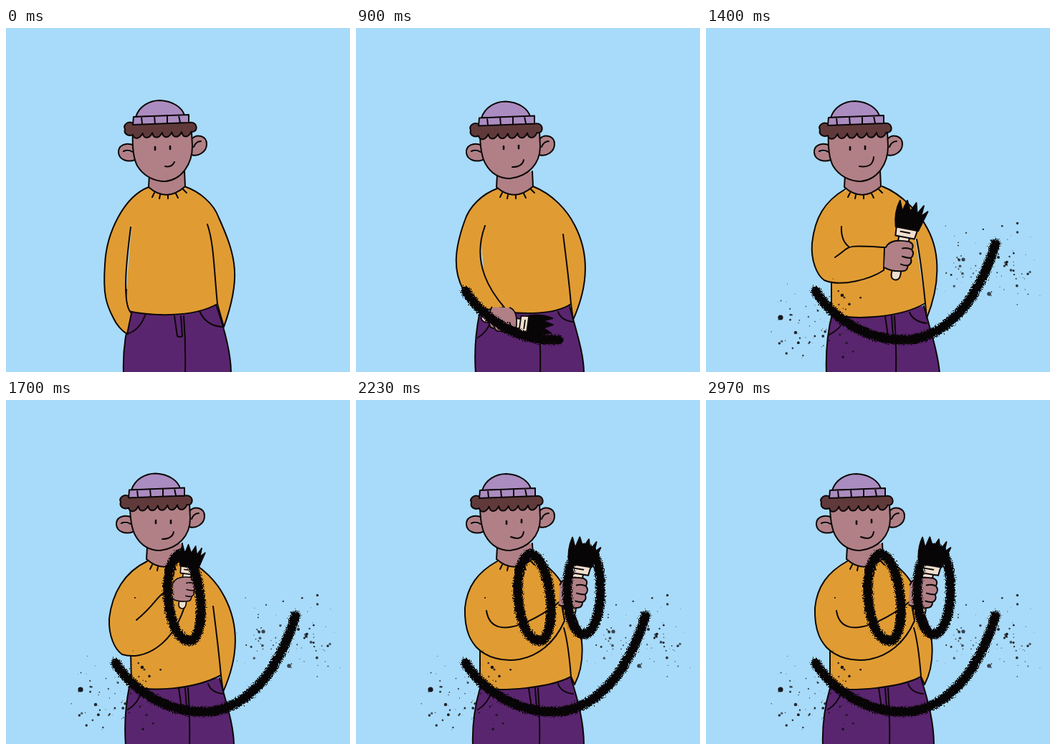
Recreate the animation shown at these times as an HTML page. Size 480 px wide and 480 px high, loop 3.01 s.

```html
<!DOCTYPE html>
<html lang="en">
<head>
<meta charset="utf-8">
<title>Painting a smile</title>
<style>
  html, body { margin: 0; width: 100%; height: 100%; overflow: hidden; background: #a8dbf9; }
  svg { display: block; width: 100vw; height: 100vh; }
  .line { fill: none; }
  .sweater { fill: #e09c33; }
  .skin { fill: #b08086; }
  .pants { fill: #5a256f; }
  .hat { fill: #ab8cc0; }
  .hair { fill: #603a3b; }
  .wood { fill: #f0dfce; }
  .ink { fill: #080506; }
</style>
</head>
<body>
<svg viewBox="0 0 480 480" stroke="#0c0708" stroke-width="2" stroke-linecap="round" stroke-linejoin="round">
  <defs>
    <filter id="rough" filterUnits="userSpaceOnUse" x="0" y="0" width="480" height="480" color-interpolation-filters="sRGB">
      <feTurbulence type="fractalNoise" baseFrequency=".65" numOctaves="2" seed="4"/>
      <feDisplacementMap in="SourceGraphic" scale="9" xChannelSelector="R" yChannelSelector="G"/>
    </filter>
  </defs>
  <rect width="480" height="480" fill="#a8dbf9" stroke="none"/>

  <path id="pants" class="pants"/>
  <g id="seam" class="line">
    <path d="M248 402Q251 440 250 482M235 402L239 430Q242 432 246 430L244 402"/>
  </g>
  <path id="pockets" class="line"/>
  <path id="torso" class="sweater" stroke="none"/>
  <path id="sleeve" class="sweater"/>
  <path id="hem" class="line"/>
  <path id="arm" class="sweater"/>
  <path id="fold" class="line"/>

  <g id="head">
    <path class="skin" d="M200 205L199 222Q224 244 250 221L249 200"/>
    <path class="line" d="M207 230L204 236M215 233L214 238M226 233L226 238M237 231L240 237M247 225L252 230"/>
    <path class="skin" d="M179 164C166 158 156 165 157 174C158 184 170 188 180 184M164 172Q170 169 177 173"/>
    <path class="skin" d="M259 155C266 147 280 150 280 162C280 173 268 180 259 177M262 166Q265 158 272 158"/>
    <path id="face" class="skin"/>
  </g>
  <path id="eyes" stroke-width="2.6"/>
  <path id="mouth" class="line"/>
  <g id="cap">
    <path id="hair" class="hair"/>
    <path class="hat" d="M181 124C186 109 200 101 215 101C233 102 246 111 249 122Z"/>
    <path class="hat" d="M178 124L255 121V132L177 135ZM189 124L190 134M207 123L208 134M225 122L225 133M241 122L243 132"/>
  </g>

  <g id="brush">
    <path class="wood" d="M-6 -28L-6 20Q-8 34 0 34Q8 34 6 20L9 -28Z"/>
    <path class="wood" d="M-12 -41H18L16 -27H-11ZM-5 -34H8"/>
    <path class="ink" d="M-13 -39Q-19 -58 -14 -76L-8 -62L-4 -78L3 -64L9 -77L13 -62L20 -75L19 -60L27 -68Q22 -50 19 -39Z"/>
    <path class="skin" d="M-21 -8C-18 -20 -4 -22 10 -22Q18 -20 15 -12Q21 -7 16 0Q20 7 14 11Q15 19 8 20Q-6 24 -18 20M15 -12Q8 -14 2 -11M16 0Q10 1 4 0M14 11Q9 12 4 11"/>
  </g>

  <g id="ink" class="line" stroke="#080506" stroke-width="13.5" filter="url(#rough)">
    <path pathLength="100" d="M153 367C180 410 230 436 275 435C335 435 380 380 404 301"/>
    <path pathLength="100" d="M243 215C215 224 222 336 257 336C284 330 272 215 242 215"/>
    <path pathLength="100" d="M320 207C288 206 286 318 316 327C347 328 350 215 322 207"/>
  </g>
  <g id="splatter" stroke="none" fill="#141318"></g>
</svg>
<script>
const LOOP = 3010, HOLD = 50;
const $ = id => document.getElementById(id);
const clamp = x => Math.max(0, Math.min(1, x));

// rig: head x, cap x, cap y, seam x, hand x, hand y, hand angle, hand scale
const idle = {
  arm: 'M199 222C165 235 140 285 138 330C135 372 140 386 150 405C154 414 162 423 169 427L175 398C160 385 170 310 174 278',
  sleeve: 'M249 221C270 228 290 245 297 265C322 320 328 350 304 417L295 385C290 335 290 300 281 274',
  hem: '168 365L166 394C200 402 260 405 295 385',
  pants: 'M175 397C166 425 163 455 164 482L314 482C314 455 305 420 293 386',
  pockets: 'M169 427Q186 422 194 401M270 395Q280 417 304 417',
  fold: 'M174 278Q174 278 174 278',
  face: 'M177 145C176 165 177 180 183 192C192 207 207 214 222 214C245 212 260 190 260 165L259 145',
  eyes: 'M208 166L208 170M229 165L229 169',
  mouth: 'M222 193Q231 195 235 187',
  rig: '0 0 0 0 185 400 240 .9'
};
const drag = {
  arm: 'M197 224C175 232 158 250 152 268C136 312 136 340 150 366C160 378 172 388 183 393L207 390C190 370 160 330 180 276',
  sleeve: 'M247 221C275 232 295 255 305 275C326 315 324 360 303 407L300 385C297 350 293 320 289 288',
  hem: '181 372L190 392C220 400 275 402 300 385',
  pants: 'M172 400C166 430 165 455 167 482L318 482C318 455 308 425 298 388',
  pockets: 'M170 432Q184 424 190 405M282 396Q286 408 303 410',
  fold: 'M180 276Q180 276 180 276',
  face: 'M176 145C176 165 178 180 184 190C192 204 204 210 218 210C243 207 260 190 260 165L259 145',
  eyes: 'M206 165L206 169M227 164L227 168',
  mouth: 'M218 194Q232 194 234 184',
  rig: '-3 -6 1.5 7 205 408 98 .9'
};
const sweep = {
  ...drag,
  arm: 'M196 225C170 240 150 270 150 300C152 330 172 350 190 355C240 365 290 355 328 342L324 314C280 318 210 330 185 285',
  hem: '174 340L175 399C205 407 270 404 300 385',
  rig: '-5 -6 1 10 348 328 60 .9'
};
const chest = {
  arm: 'M194 225C165 242 152 265 148 300C146 325 155 345 165 352C190 362 230 350 248 338L249 306C190 303 205 303 180 320',
  sleeve: 'M246 221C275 232 300 262 309 280C328 315 326 360 308 405L306 384C303 355 300 325 294 295',
  hem: '175 350L175 399C205 408 270 405 306 384',
  pants: 'M176 399C168 430 167 455 168 482L326 482C324 455 314 425 304 388',
  pockets: 'M172 428Q188 420 194 405M284 397Q290 410 308 412',
  fold: 'M189 277Q188 296 199 305',
  face: idle.face,
  eyes: 'M201 166L201 170M222 165L222 169',
  mouth: 'M214 193Q233 196 234 180',
  rig: '-6 -7 1 15 270 318 11 1'
};
const leftEye = {
  ...drag,
  arm: 'M197 225C165 240 148 270 144 305C143 330 152 348 162 355C190 364 235 345 252 278L234 265C210 268 215 280 182 307',
  hem: '174 350L175 399C200 407 260 405 300 384',
  eyes: 'M209 168L209 172M230 168L230 172',
  rig: '-3 -6 1.5 6 249 264 8 .8'
};
const rightEye = {
  ...drag,
  arm: 'M197 225C170 240 155 260 152 290C151 325 162 338 168 345C195 373 262 374 291 308L286 280C262 300 190 345 182 294',
  sleeve: 'M247 222C265 228 290 245 300 290C322 330 318 372 305 397L300 386C298 360 295 335 290 318',
  hem: '173 350L173 402C205 407 270 402 300 386',
  pants: 'M173 402C165 430 162 455 163 482L318 482C318 450 310 420 300 388',
  eyes: 'M210 169L210 173M231 167L231 171',
  mouth: 'M216 191Q232 197 234 184',
  rig: '-3 -5 2 6 304 269 9 1'
};
const reach = { ...mix(drag, chest, .6), rig: '-2 -4 1 4 218 338 240 .9' };

const keys = [
  [0, idle], [570, idle], [770, reach], [900, drag], [1070, sweep], [1250, chest], [1500, chest],
  [1570, leftEye], [1630, mix(leftEye, chest, .8)], [1690, leftEye], [1780, leftEye],
  [1920, rightEye], [2010, mix(rightEye, sweep, .4)], [2110, rightEye], [LOOP, rightEye]
];
const strokes = [[760, 1075], [1560, 1690], [1920, 2110]];

function numbers(text) {
  return text.match(/-?\d*\.?\d+/g).map(Number);
}

function mix(a, b, k) {
  const out = {};
  for (const part in a) {
    const goal = numbers(b[part]);
    let i = 0;
    out[part] = a[part].replace(/-?\d*\.?\d+/g, n => (+n + (goal[i++] - n) * k).toFixed(2));
  }
  return out;
}

function poseAt(t) {
  const i = keys.findIndex(([time]) => time > t);
  const [t0, a] = keys[i - 1], [t1, b] = keys[i];
  return a === b ? a : mix(a, b, (t - t0) / (t1 - t0));
}

function makeHair() {
  let d = 'M178 133C170 129 163 135 166 141C164 147 170 152 177 149';
  for (let i = 1; i <= 6; i++) {
    const x = 177 + i * 13.6, y = 148 - i * .4;
    d += `C${x - 12} ${y + 8} ${x - 4} ${y + 8} ${x} ${y - 1}`;
  }
  $('hair').setAttribute('d', d + 'C268 147 269 130 256 132Z');
}

function makeSplatter() {
  let seed = 23;
  const rand = () => (seed = seed * 16807 % 2147483647) / 2147483647;
  const spread = () => rand() + rand() - 1;
  const dots = [[104, 404, 3.6], [125, 425, 2.3], [190, 373, 2.3], [359, 323, 2.6], [408, 320, 2], [395, 371, 2.8]];
  for (let i = 0; i < 180; i++) {
    const [x, y] = i % 2 ? [160, 408] : [398, 330];
    dots.push([x + spread() * 78, y + spread() * 66, .4 + rand() ** 2 * 1.5]);
  }
  $('splatter').innerHTML = dots.map(([x, y, r]) =>
    `<circle cx="${x}" cy="${y}" r="${r}" opacity="${.65 + rand() * .35}"/>`).join('');
}

function draw(time) {
  const t = Math.floor(time / HOLD) * HOLD;
  const pose = poseAt(t);
  const [head, capX, capY, seam, x, y, angle, scale] = numbers(pose.rig);
  for (const part of ['arm', 'sleeve', 'pants', 'pockets', 'fold', 'face', 'eyes', 'mouth']) {
    $(part).setAttribute('d', pose[part]);
  }
  $('hem').setAttribute('d', 'M' + pose.hem);
  $('torso').setAttribute('d', `M198 223L178 250L174 290L${pose.hem}L293 300L278 255L248 222Z`);
  $('head').setAttribute('transform', `translate(${head} 0)`);
  $('cap').setAttribute('transform', `translate(${capX} ${capY})`);
  $('seam').setAttribute('transform', `translate(${seam} 0)`);
  $('brush').setAttribute('transform', `translate(${x} ${y}) rotate(${angle}) scale(${scale})`);
  $('brush').style.display = t >= 700 ? '' : 'none';
  strokes.forEach(([from, to], i) => {
    const path = $('ink').children[i], done = clamp((t - from) / (to - from));
    path.style.display = done ? '' : 'none';
    path.setAttribute('stroke-dasharray', `${done * 100} 200`);
  });
  $('splatter').style.display = t >= 1100 ? '' : 'none';
}

makeHair();
makeSplatter();
const start = performance.now();
function tick() {
  draw((performance.now() - start) % LOOP);
  requestAnimationFrame(tick);
}
tick();
</script>
</body>
</html>
```
